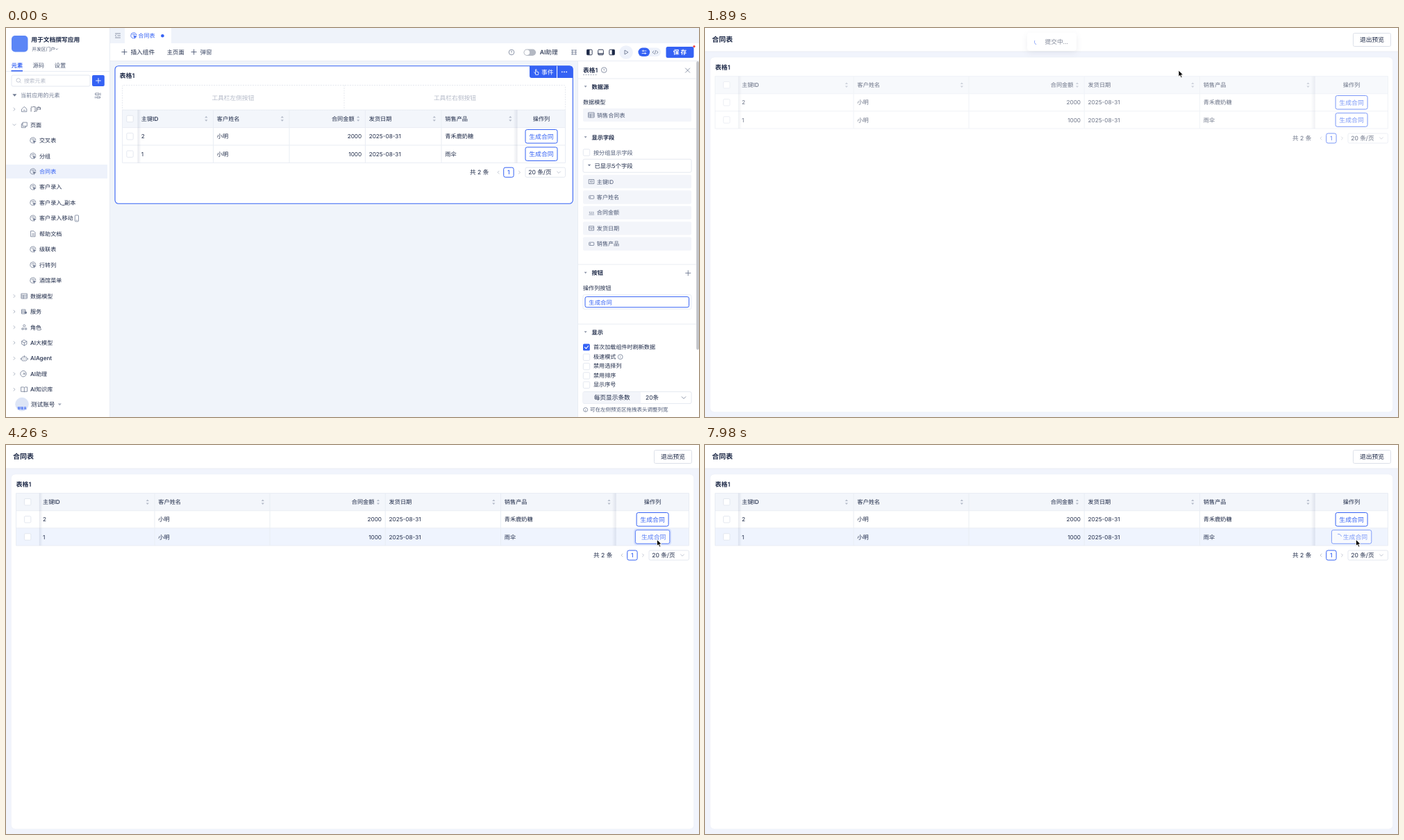
Recreate the animation shown at these times as an HTML page. Size 998 by 561 pixels, loop 8 s.

```html
<!DOCTYPE html>
<html>
<head>
<meta charset="utf-8">
<title>Table preview</title>
<style>
html, body { margin: 0; width: 100%; height: 100%; overflow: hidden; background: #fff; }
svg { display: block; width: 998px; height: 561px; }
text { font-family: Inter, "Noto Sans CJK SC", "Noto Sans CJK", sans-serif; text-rendering: geometricPrecision; white-space: pre; }
#msg rect { filter: drop-shadow(0 3px 5px rgba(60, 70, 100, .16)); }
#tip { transform-origin: 893px 25px; }
</style>
</head>
<body>
<svg id="stage" viewBox="0 0 998 561" xmlns="http://www.w3.org/2000/svg"></svg>
<script>
const BLUE = '#3562f4', INK = '#1d2947', MID = '#4c5874', SOFT = '#6f7a92', PALE = '#b4bac8';
const LINE = '#e9edf4', FILL = '#f3f5fa', EDGE = '#dde2ec';

// Drawing helpers, each returns SVG markup
const rect = (x, y, w, h, fill, stroke = 'none', rx = 0, more = '') =>
  `<rect x="${x}" y="${y}" width="${w}" height="${h}" fill="${fill}" stroke="${stroke}" rx="${rx}" ${more}/>`;
const text = (x, cy, s, size = 8, fill = INK, weight = 400, anchor = 'start') =>
  `<text x="${x}" y="${(cy + size * .37).toFixed(2)}" font-size="${size}" fill="${fill}" font-weight="${weight}" text-anchor="${anchor}">${s}</text>`;
const path = (d, stroke = SOFT, w = .8, fill = 'none') =>
  `<path d="${d}" stroke="${stroke}" stroke-width="${w}" fill="${fill}" stroke-linejoin="round" stroke-linecap="round"/>`;
const circle = (x, y, r, fill, stroke = 'none') =>
  `<circle cx="${x}" cy="${y}" r="${r}" fill="${fill}" stroke="${stroke}" stroke-width=".8"/>`;
const hline = (x, y, w, c = LINE) => rect(x, y - .5, w, 1, c);
const vline = (x, y, h, c = LINE) => rect(x - .5, y, 1, h, c);

const chevron = (x, y, dir, c = '#99a2b4', r = 2) => path({
  right: `M${x - r / 2} ${y - r}l${r} ${r}l${-r} ${r}`,
  left: `M${x + r / 2} ${y - r}l${-r} ${r}l${r} ${r}`,
  down: `M${x - r} ${y - r / 2}l${r} ${r}l${r} ${-r}`
}[dir], c);
const caret = (x, y, c = '#8c95a8', r = 2.3) => path(`M${x - r} ${y - r * .6}h${2 * r}l${-r} ${r * 1.2}z`, 'none', 0, c);
const plus = (x, y, c, r = 3.6) => path(`M${x - r} ${y}h${2 * r}M${x} ${y - r}v${2 * r}`, c, .9);
const box = (x, y) => rect(x - 4.7, y - 4.7, 9.4, 9.4, '#fff', EDGE, 1.5, 'stroke-width=".8"');
const badge = (x, y, s, r = 3.8) => circle(x, y, r, 'none', SOFT) + text(x, y, s, 5.5, SOFT, 400, 'middle');
const sorter = (x, y) => caret(x, y + 2.5, '#b3bac8', 2.1) + path(`M${x - 2.1} ${y - 1.3}h4.2l-2.1 -2.5z`, 'none', 0, '#b3bac8');

const icons = {
  home: (x, y) => path(`M${x - 3.5} ${y - .5}l3.5 -3.2l3.5 3.2v4h-7zM${x - 1.2} ${y + 1.5}h2.4`),
  pages: (x, y) => path(`M${x - 2} ${y - 3.5}h6v5.5h-6zM${x - 2} ${y - 1.5}h-2v5.5h6v-2`),
  page: (x, y, c = SOFT) => path(`M${x + 3.8} ${y - .5}a4 4 0 1 0 -4 4.3M${x - 2} ${y - 1.5}q2 -1.5 4 0`, c) +
    path(`M${x} ${y}l4.2 1.4l-1.8 .9l-.9 1.8z`, c, .6, c),
  doc: (x, y) => path(`M${x - 3} ${y - 4}h4l2 2v6h-6zM${x - 1.2} ${y}h2.6M${x - 1.2} ${y + 2}h2.6`),
  grid: (x, y) => path(`M${x - 4} ${y - 3.5}h8v7h-8zM${x - 4} ${y - 1.2}h8M${x - 4} ${y + 1.2}h8M${x - 1.2} ${y - 1.2}v4.7`),
  stack: (x, y) => path(`M${x - 3.4} ${y - 3}h5v6h-5zM${x - 3.4} ${y - 1}h5M${x - 3.4} ${y + 1}h5`) + circle(x + 2, y + 1.5, 1.8, SOFT),
  role: (x, y) => circle(x, y - 2, 1.6, 'none', SOFT) + path(`M${x - 3.4} ${y + 3}v-1.6h2.4v1.6zM${x + 1} ${y + 3}v-1.6h2.4v1.6z`),
  cube: (x, y) => path(`M${x} ${y - 4}l3.6 2v4l-3.6 2l-3.6 -2v-4zM${x - 3.6} ${y - 2}l3.6 2l3.6 -2M${x} ${y}v4`),
  bot: (x, y) => rect(x - 3.6, y - 2, 7.2, 5.5, 'none', SOFT, 1.5, 'stroke-width=".8"') + path(`M${x} ${y - 2}v-2M${x - 1.3} ${y + .5}v.6M${x + 1.3} ${y + .5}v.6M${x - 5} ${y}v1.6M${x + 5} ${y}v1.6`),
  chat: (x, y) => path(`M${x - 3.5} ${y + 3.5}a4.3 4.3 0 1 1 2 .6z`) + text(x, y, 'AI', 4.2, SOFT, 600, 'middle'),
  book: (x, y) => path(`M${x} ${y - 2.6}v6.2M${x - 4.3} ${y - 3.4}h3.3l1 .8l1 -.8h3.3v6.4h-8.6z`),
  field: (x, y) => rect(x - 3.5, y - 2.2, 7, 4.4, 'none', SOFT, .6, 'stroke-width=".8"') + path(`M${x - 1.8} ${y - .8}v1.6`),
  num: (x, y) => text(x, y, '123', 4.4, SOFT, 500, 'middle') + path(`M${x - 3.5} ${y + 2.8}h7`, SOFT, .6),
  date: (x, y) => path(`M${x - 3.3} ${y - 3}h6.6v6h-6.6zM${x - 3.3} ${y - .8}h6.6M${x - 1} ${y + 1}h2`),
  key: (x, y) => path(`M${x - 3.6} ${y - 3}h7.2v6h-7.2z`) + text(x, y, 'ID', 4.4, SOFT, 600, 'middle')
};

const button = (cx, cy, id = '') => `<g id="${id}">` +
  rect(cx - 23, cy - 9.8, 46, 19.6, '#fff', BLUE, 2.5) + text(cx, cy, '生成合同', 8.9, BLUE, 400, 'middle') + '</g>';

// The data table; cols holds the column edges from left to right
function table(cols, top, rowH, live) {
  const [l, a, b, c, d, e, f, r] = cols, w = r - l, mid = (l + a) / 2, op = (f + r) / 2;
  const head = top + rowH / 2, end = top + 3 * rowH;
  let s = rect(l, top, w, rowH, '#f3f6fb');
  [[a, b, '主键ID'], [b, c, '客户姓名'], [d, e, '发货日期'], [e, f, '销售产品']].forEach(([x0, x1, t]) =>
    s += text(x0 + 5.3, head, t, 8.2, INK, 500) + sorter(x1 - 10.2, head));
  s += text(d - 15.7, head, '合同金额', 8.2, INK, 500, 'end') + sorter(d - 10.2, head) + box(mid, head);
  s += text(op, head, '操作列', 8.2, INK, 500, 'middle');
  [['2', '2000', '青禾鹿奶糖'], ['1', '1000', '雨伞']].forEach(([id, sum, item], i) => {
    const y = top + rowH * (i + 1), cy = y + rowH / 2;
    s += rect(l, y, w, rowH, '#fff', 'none', 0, live ? `id="row${i}"` : '') + box(mid, cy);
    s += text(a + 5.3, cy, id, 8.2) + text(b + 5.3, cy, '小明', 8.2) + text(d - 5.2, cy, sum, 8.2, INK, 400, 'end');
    s += text(d + 5.3, cy, '2025-08-31', 8.2) + text(e + 5.3, cy, item, 8.2);
    s += button(op, cy, live && i ? 'act' : '');
  });
  for (let i = 0; i < 4; i++) s += hline(l, top + i * rowH, w);
  [l, b, c, d, e, r].forEach(x => s += vline(x, top, end - top));
  s += rect(a, top, 5, end - top, 'url(#fadeR)') + rect(f - 6, top, 6, end - top, 'url(#fadeL)');
  return s;
}

function pager(r, y) {
  return text(r - 137.5, y, '共 2 条', 8.6) + chevron(r - 96.5, y, 'left', PALE) +
    rect(r - 88.8, y - 7, 14.4, 14, '#fff', BLUE, 2.5) + text(r - 81.6, y, '1', 8.6, BLUE, 500, 'middle') +
    chevron(r - 66, y, 'right', PALE) + rect(r - 57.5, y - 7, 57.5, 14, '#fff', EDGE, 2, 'stroke-width=".8"') +
    text(r - 53.3, y, '20 条/页', 8.6) + chevron(r - 9.5, y, 'down', PALE, 2.4);
}

function sidebar() {
  let s = rect(0, 0, 149.5, 561, '#fff') + rect(8, 11, 23.5, 23.5, '#5b86f6', 'none', 5);
  s += text(36.3, 16.3, '用于文档撰写应用', 8.75, INK, 600) + text(37.2, 30.5, '开发区门户', 6.8, MID) + chevron(73, 30.5, 'down', SOFT, 1.5);
  s += text(7.8, 53.5, '元素', 8.2, BLUE, 600) + text(38.6, 53.5, '源码', 8.2, MID) + text(69.8, 53.5, '设置', 8.2, MID);
  s += hline(0, 62.5, 149) + rect(7.5, 61, 16.5, 1.6, BLUE);
  s += rect(8, 68, 113, 16, '#fff', EDGE, 2, 'stroke-width=".8"') + circle(17.8, 75.4, 2.8, 'none', PALE) + path('M20 77.6l1.5 1.5', PALE);
  s += text(26, 76, '搜索元素', 7.8, PALE) + rect(124, 68, 17.8, 16, BLUE, 'none', 2) + plus(133, 76, '#fff', 3.4);
  s += caret(12.4, 97, SOFT, 3) + text(21, 97.2, '当前应用的元素', 8.1, SOFT);
  s += path('M129 94h5v2.5h-5zM131 99h4.5v2h-4.5zM136 94v3M128.5 99v2');
  s += rect(0, 197, 146, 20, '#eef2fb');
  const tree = [['home', '门户'], ['pages', '页面'], '交叉表', '分组', '合同表', '客户录入', '客户录入_副本', '客户录入移动', '帮助文档',
    '级联表', '行转列', '酒馆菜单', ['grid', '数据模型'], ['stack', '服务'], ['role', '角色'], ['cube', 'AI大模型'],
    ['bot', 'AIAgent'], ['chat', 'AI助理'], ['book', 'AI知识库']];
  tree.forEach((n, i) => {
    const y = 117.2 + i * 22.45;
    if (Array.isArray(n)) {
      s += chevron(12, y, i === 1 ? 'down' : 'right') + icons[n[0]](26.3, y) + text(35, y, n[1], 8.1, INK, 500);
    } else {
      s += icons[n === '帮助文档' ? 'doc' : 'page'](39, y) + text(48, y, n, 8.1, i === 4 ? BLUE : INK, 500);
    }
  });
  s += rect(99.3, 270, 5.2, 9, 'none', SOFT, 1, 'stroke-width=".8"') + path('M101.2 277.2h1.4', SOFT, .6);
  s += circle(23, 542.6, 9.8, '#dde5f6') + text(23, 548.3, '管理员', 4.4, BLUE, 600, 'middle');
  return s + text(35.8, 542.5, '测试账号', 8.7) + caret(77.3, 543, '#a3abbb', 2.6) + vline(149.5, 0, 561);
}

function topBar() {
  let s = rect(150, 0, 848, 22, '#eff3fa') + rect(171, 0, 67, 22, '#fff') + rect(150, 22, 848, 25.5, '#fff') + hline(150, 47.5, 848);
  s += path('M157.5 8h7M160.8 11h3.7M157.5 14h7M158.6 9.7l-1.3 1.3l1.3 1.3') + icons.page(184, 11, BLUE) + text(190.3, 11.2, '合同表', 8.1, BLUE, 500) + circle(225.4, 11.2, 2.3, BLUE);
  s += plus(170.4, 34.6, MID) + text(179.4, 35, '插入组件', 8.7) + text(231.8, 35, '主页面', 8.3) + plus(270.6, 34.6, MID) + text(279.4, 35, '弹窗', 8.7, MID);
  s += badge(728, 35, '?') + rect(745.5, 30.6, 17.6, 9.4, '#b4b9c3', 'none', 4.7) + circle(750.3, 35.3, 3.8, '#fff') + text(768.8, 35, 'AI助理', 8.7, INK, 500);
  s += path('M814.5 32h7M814.5 35h7M814.5 38h7M815.5 32v6M820.5 32v6', SOFT, .8);
  [840.3, 856.5, 872.6].forEach((x, i) => {
    s += rect(x - 3.8, 31.2, 7.6, 7.6, 'none', INK, 1.2, 'stroke-width=".9"');
    s += [rect(x - 3.8, 31.2, 4, 7.6, INK), rect(x - 3.8, 36.4, 7.6, 1.2, INK), rect(x, 31.2, 3.8, 7.6, INK)][i];
  });
  s += '<circle id="playBg" cx="893" cy="35" r="9.8" fill="#eef2fb"/><path id="play" d="M891 32l5 3l-5 3z" fill="none" stroke-width=".9" stroke-linejoin="round"/>';
  s += rect(910, 28.6, 33, 12.4, '#eef2fb', 'none', 6.2) + rect(910.5, 28.6, 16.6, 12.4, BLUE, 'none', 6.2);
  s += path('M916 33h6M916 36.5h6M917.6 32v2M920.4 35.5v2', '#fff', .8) + path('M933 33l-2 2l2 2M937 33l2 2l-2 2M935.7 32.4l-1.4 5.2');
  return s + rect(950.5, 27, 40, 16, BLUE, 'none', 2.5) + text(970.5, 35, '保 存', 8.7, '#fff', 600, 'middle') + circle(991, 26.6, 1.6, '#f0443c');
}

function canvasPart() {
  let s = rect(150, 48, 673.5, 513, '#f0f4fa') + rect(157, 54.7, 659.3, 198.6, '#fff', BLUE, 5, 'stroke-width="1.1"');
  s += text(163.5, 69, '表格1', 9, INK, 600) + path('M754 54.7h58q4.3 0 4.3 4.3v13h-59.3q-3 0 -3 -3z', 'none', 0, BLUE) + rect(793, 54.7, 1, 17.3, '#fff');
  s += path('M762.5 66l-1.8 -2.2M762.5 66v-6q.8 -1 1.5 0v3l3 .8l-.5 3.6h-3.4z', '#fff') + text(771, 63.3, '事件', 8.7, '#fff', 500);
  [800.8, 804, 807.2].forEach(x => s += circle(x, 63.3, .9, '#fff'));
  s += rect(167.5, 82.5, 638, 36, 'none', '#dfe3eb', 2, 'stroke-width=".8" stroke-dasharray="2 1.5"');
  s += '<path d="M487 82.5v36" stroke="#dfe3eb" stroke-width=".8" stroke-dasharray="2 1.5"/>';
  s += text(327, 100.5, '工具栏左侧按钮', 8.75, PALE, 400, 'middle') + text(646.5, 100.5, '工具栏右侧按钮', 8.75, PALE, 400, 'middle');
  return s + table([167.5, 189.5, 298.5, 408, 517.4, 627, 736.5, 805.5], 118.2, 25.4) + pager(805.5, 208.2);
}

function panel() {
  const title = (y, t) => caret(834.6, y, '#8c95a8', 2) + text(843.5, y, t, 8.2, INK, 600);
  let s = rect(823.5, 48, 174.5, 513, '#fff') + vline(823.5, 48, 513);
  s += text(831, 60.5, '表格1', 8.7, INK, 600) + '<path d="M831 67.5h21" stroke="#8c95a8" stroke-width=".8" stroke-dasharray="2 1.5"/>';
  s += badge(861.2, 60.6, '?') + path('M978.5 58l6.2 6.2M984.7 58l-6.2 6.2');
  [73, 145.5, 341, 427].forEach(y => s += hline(824, y, 170));
  s += title(84.5, '数据源') + text(831, 106.5, '数据模型', 8.1) + rect(831, 116, 156, 19, FILL, 'none', 2) + icons.grid(843, 125.5) + text(851, 125.7, '销售合同表', 8.1, MID);
  s += title(157.5, '显示字段') + box(836, 179.5) + text(846, 179.5, '按分组显示字段', 8.1, MID);
  s += rect(831, 189.2, 156, 19, '#fff', EDGE, 2, 'stroke-width=".8"') + caret(840, 198, SOFT, 2.2) + text(847.5, 198.8, '已显示5个字段', 8.4);
  [['key', '主键ID'], ['field', '客户姓名'], ['num', '合同金额'], ['date', '发货日期'], ['field', '销售产品']].forEach(([k, t], i) => {
    const y = 221.5 + i * 22.45;
    s += rect(831, y - 9.7, 156, 19.4, FILL, 'none', 2) + icons[k](843.2, y) + text(850.8, y, t, 8.1, MID);
  });
  s += title(353, '按钮') + plus(982.3, 353.4, SOFT) + text(831, 375, '操作列按钮', 8.1);
  s += rect(831, 384.8, 156, 20.6, '#fff', LINE, 2) + rect(834, 387.6, 149.6, 15.2, '#fff', BLUE, 2.5) + text(839.3, 395.4, '生成合同', 8.4, BLUE);
  s += title(438.5, '显示');
  ['首次加载组件时刷新数据', '极速模式', '禁用选择列', '禁用排序', '显示序号'].forEach((t, i) => {
    const y = i ? 460.8 + i * 13.35 : 459.8;
    s += (i ? box(836, y + .6) : rect(831, 455.4, 9.8, 9.8, BLUE, 'none', 1.5) + path('M833.5 460.3l1.9 2l3.2 -3.8', '#fff', 1.1)) + text(846, y - .3, t, 8.1);
  });
  s += badge(884.7, 474.3, 'i', 3.4) + rect(831, 524.6, 156, 17, '#fff', EDGE, 2, 'stroke-width=".8"') + rect(831.4, 525, 82.6, 16.2, FILL);
  s += text(872.7, 533, '每页显示条数', 8.7, INK, 400, 'middle') + text(921, 533, '20条', 8.5) + chevron(976, 533.2, 'down', SOFT, 2.8);
  s += badge(834.6, 550.5, 'i', 3) + text(841, 549.8, '可在左侧预览区拖拽表头调整列宽', 7.5, MID);
  return s + rect(994.2, 48, 3.8, 416, '#c2c4c9', 'none', 1.9);
}

function preview() {
  return rect(0, 0, 998, 561, '#f1f4fc') + rect(0, 0, 998, 34, '#fff') + hline(0, 34, 998) + text(10, 16.5, '合同表', 10, INK, 600) +
    rect(933.5, 7.5, 54, 19, '#fff', '#d9dde7', 2, 'stroke-width=".9"') + text(960.5, 17, '退出预览', 8.8, INK, 400, 'middle') +
    rect(7.3, 42, 983.4, 512, '#fff', '#ebeff6', 6, 'stroke-width=".6"') + text(14.5, 56.5, '表格1', 9, INK, 600) +
    `<g id="grid">${table([14.5, 47.8, 214, 380, 546.2, 712.5, 878.7, 983.5], 69.6, 25.15, true)}${pager(983.5, 159)}</g>`;
}

const fade = (id, a, b) => `<linearGradient id="${id}"><stop stop-color="#304070" stop-opacity="${a}"/><stop offset="1" stop-color="#304070" stop-opacity="${b}"/></linearGradient>`;
const spinner = (id, c) => `<path id="${id}" d="M0 -4a4 4 0 0 1 4 4" fill="none" stroke="${c}" stroke-width=".9" stroke-linecap="round"/>`;
const $ = id => document.getElementById(id);

$('stage').innerHTML = `<defs>${fade('fadeR', .11, 0)}${fade('fadeL', 0, .11)}</defs>
<g id="editor">${canvasPart()}${sidebar()}${topBar()}${panel()}</g>
<g id="preview">${preview()}</g>
<g id="tip">${rect(866.4, 2, 53.2, 20, '#37383b', 'none', 2.5)}${path('M889.5 22h7l-3.5 3.2z', 'none', 0, '#37383b')}${text(893, 12, '保存并预览', 8.8, '#fff', 400, 'middle')}</g>
<g id="msg">${rect(464, 7, 71, 26, '#fff', 'none', 4)}${text(489.5, 19.8, '提交中...', 8.7)}${spinner('msgSpin', BLUE)}</g>
<g id="cursor">
<path id="arrow" d="M0 0v9.2l2.1 -1.9l1.5 3.4l1.6 -.7l-1.5 -3.3h2.9z" fill="#000" stroke="#fff" stroke-width=".8"/>
<path id="hand" d="M-1 6.2V.8Q0 -.6 1 .8v3.4q1 -.8 1.7 .2q1 -.5 1.6 .4q1.4 -.3 1.5 1.1q.1 2.4 -1.2 4.4H-.2Q-1.4 8.600 -3 6.600q.2 -1.3 2 .6z" fill="#fff" stroke="#000" stroke-width=".8" stroke-linejoin="round"/>
</g>`;

// The button that goes into its loading state
const act = $('act'), [actBox, actText] = act.children;
act.insertAdjacentHTML('afterbegin', rect(0, 0, 0, 0, 'none', BLUE, 3, 'id="wave"'));
act.insertAdjacentHTML('beforeend', spinner('actSpin', BLUE));

const LOOP = 8000, SWITCH = 1640, CLICK = 4140;
// Cursor stops: time, x, y
const track = [[0, 732, -14], [110, 732, -14], [300, 775, 28], [480, 850, 49], [600, 898, 44], [720, 889.5, 35.5], [1480, 889.5, 35.5],
  [1890, 682, 61], [2170, 835, 122], [2540, 470.5, 130], [2690, 482, 131.3], [2850, 482, 131.3], [3640, 940, 137.5], [3820, 937.5, 136.3], [LOOP, 937.5, 136.3]];

const clamp = v => Math.max(0, Math.min(1, v));
const ramp = (t, from, to) => clamp((t - from) / (to - from));
const inOut = v => v < .5 ? 4 * v ** 3 : 1 - (2 - 2 * v) ** 3 / 2;
const outCubic = v => 1 - (1 - v) ** 3;

function slope(i, k) {
  const p = track[i - 1], q = track[i], r = track[i + 1];
  if (!p || !r) return 0;
  const a = (q[k] - p[k]) / (q[0] - p[0]), b = (r[k] - q[k]) / (r[0] - q[0]);
  return a * b > 0 ? 2 * a * b / (a + b) : 0;
}

function cursorAt(t, k) {
  let i = 0;
  while (i < track.length - 2 && track[i + 1][0] <= t) i++;
  const p = track[i], q = track[i + 1], d = q[0] - p[0], u = (t - p[0]) / d, v = 1 - u;
  return p[k] * v * v * (1 + 2 * u) + q[k] * u * u * (3 - 2 * u) + d * u * v * (slope(i, k) * v - slope(i + 1, k) * u);
}

const set = (node, attrs) => { for (const k in attrs) node.setAttribute(k, attrs[k]); };
const show = (id, on) => { $(id).style.display = on ? '' : 'none'; };

function draw(t) {
  const x = cursorAt(t, 1), y = cursorAt(t, 2), inPreview = t >= SWITCH;
  const onPlay = !inPreview && Math.hypot(x - 893, y - 35) < 10;
  show('editor', !inPreview);
  show('preview', inPreview);
  show('arrow', !onPlay);
  show('hand', onPlay);
  set($('cursor'), { transform: `translate(${x} ${y})` });
  set($('playBg'), { fill: onPlay ? '#e6ecfb' : '#eef2fb' });
  set($('play'), { stroke: onPlay ? BLUE : SOFT });

  const tip = inPreview ? 0 : outCubic(ramp(t, 960, 1210));
  $('tip').style.opacity = tip;
  $('tip').style.transform = `scale(${.8 + .2 * tip})`;

  set($('msg'), { opacity: ramp(t, 1460, 1600) * (1 - ramp(t, 1800, 2000)) });
  set($('msgSpin'), { transform: `translate(478.500 20) rotate(${205 + .36 * (t - 1890)})` });
  set($('grid'), { opacity: .5 + .5 * ramp(t, 1830, 2030) });
  [94.75, 119.9].forEach((top, i) => set($('row' + i), { fill: inPreview && y >= top && y < top + 25.15 ? '#eff4fe' : '#fff' }));

  const k = inOut(ramp(t, CLICK - 10, CLICK + 300)), w = 46 + 11.4 * k, left = 931.1 - w / 2, top = 122.675;
  set(actBox, { x: left, width: w });
  set(actText, { x: 931.1 + 5.4 * k });
  act.style.opacity = 1 - .4 * ramp(t, CLICK - 40, CLICK + 260);
  set($('actSpin'), { transform: `translate(912.500 132.400) rotate(${145 + .36 * (t - 6420)}) scale(${k})`, opacity: k });
  const grow = 3.5 * outCubic(ramp(t, CLICK, CLICK + 400));
  set($('wave'), {
    x: left - grow / 2, y: top - grow / 2, width: w + grow, height: 19.6 + grow,
    'stroke-width': grow, opacity: t < CLICK ? 0 : .22 * (1 - ramp(t, CLICK, CLICK + 700))
  });
}

let start;
function tick(now) {
  if (start === undefined) start = now;
  draw((now - start) % LOOP);
  requestAnimationFrame(tick);
}
draw(0);
requestAnimationFrame(tick);
</script>
</body>
</html>
```
